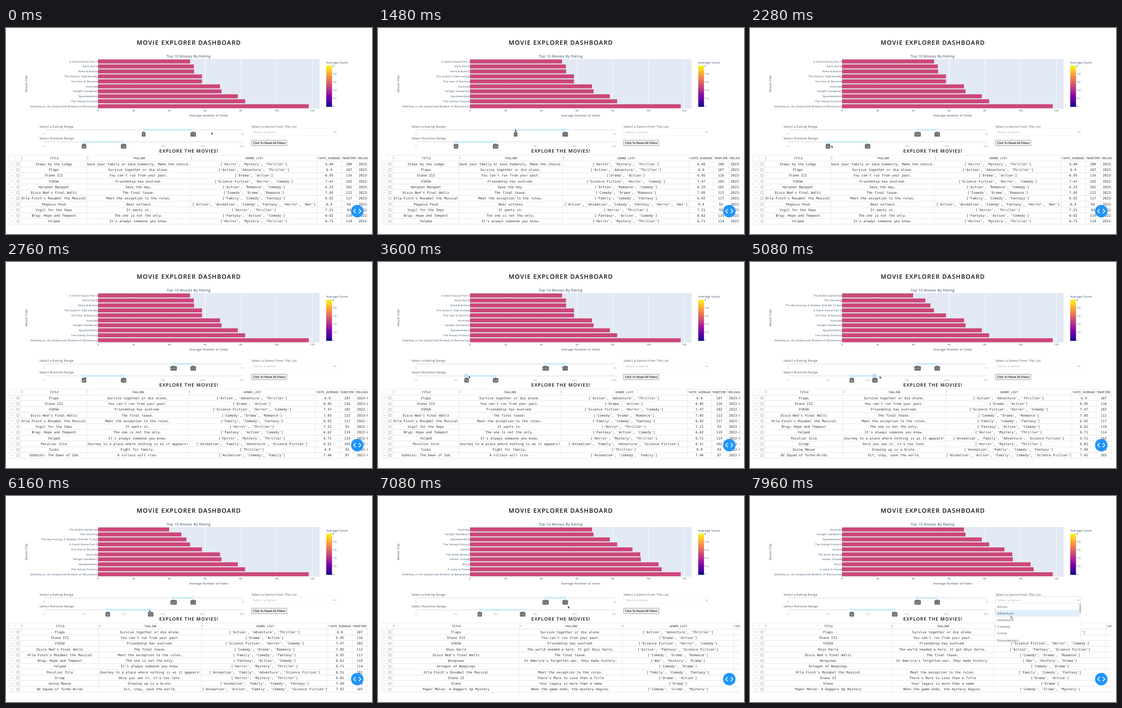
An HTML page that plays this animation: 720 px wide and 405 px high, repeating every 8 s.

```html
<!DOCTYPE html>
<html lang="en">
<head>
<meta charset="utf-8">
<title>Movie Explorer Dashboard</title>
<style>
  html, body { margin: 0; width: 100%; height: 100%; overflow: hidden; background: #fff; }
  svg { display: block; width: 100vw; height: 100vh; }
  text { font-family: "Open Sans", sans-serif; text-rendering: geometricPrecision; white-space: pre; }
  .mono { font-family: "DejaVu Sans Mono", monospace; }
  .button { font-family: "Liberation Sans", sans-serif; }
</style>
</head>
<body>
<svg viewBox="0 0 720 405">
  <defs>
    <clipPath id="tableClip"><rect x="0" y="245" width="712" height="142"/></clipPath>
    <clipPath id="menuClip"><rect x="483" y="211" width="168" height="75.5"/></clipPath>
    <linearGradient id="plasma" x1="0" y1="1" x2="0" y2="0"></linearGradient>
  </defs>
  <g id="page"></g>
  <g id="chart"></g>
  <g id="table" clip-path="url(#tableClip)"></g>
  <g id="sliders"></g>
  <g id="menu"></g>
  <g id="cursor"></g>
</svg>
<script>
const LOOP = 8000;
const layer = id => document.getElementById(id);

// Markup helpers; the y of a text is its visual middle.
const text = (x, y, str, { size = 6, fill = "#333", anchor = "start", spacing = 0, weight = 400, cls = "", extra = "" } = {}) =>
  `<text class="${cls}" x="${x}" y="${y + size * 0.36}" font-size="${size}" fill="${fill}" text-anchor="${anchor}" letter-spacing="${spacing}" font-weight="${weight}" ${extra}>${str}</text>`;
const rect = (x, y, w, h, fill, extra = "") =>
  `<rect x="${x}" y="${y}" width="${w}" height="${h}" fill="${fill}" ${extra}/>`;
const line = (x1, y1, x2, y2, color, width = 0.6) =>
  `<path d="M${x1} ${y1}L${x2} ${y2}" stroke="${color}" stroke-width="${width}"/>`;
const path = (d, extra) => `<path d="${d}" ${extra}/>`;

const heading = (x, y, str, size, spacing) => text(x, y, str, { size, spacing, weight: 600, fill: "#111", anchor: "middle" });
const label = (x, y, str, fill = "#444", weight = 400) => text(x, y, str, { size: 6, spacing: 0.35, fill, weight });
const chartText = (x, y, str, size, anchor = "middle", extra = "") =>
  text(x, y, str, { size, anchor, extra, spacing: 0.33, fill: "#2a3f5f", weight: 500 });

// ---------- Data ----------
const ratingBars = {
  "Otterboy or (An Unplanned Wisdom of Reluctance)": 595.5,
  "A Lamp Is Found": 558, "Brunt": 552, "Harbor Grande": 517, "The Ninth Mineral": 516, "Vandro": 500.5,
  "The Holvey Protocol": 470.5, "Spookwardens": 456, "Twilight Gardeners": 424, "Huntvale": 421,
  "The Year of Rosmira": 385.5, "The Sultan's Odd Holiday": 385.5, "Nima &amp; Button": 370, "Early Storm": 369.5,
  "A Silent House Part II": 362, "The Murmuring: A Shadow Told Me To Run": 355,
  "The Courtling": 345, "The Noble Harkwinds": 321
};
const longFilms = ["A Lamp Is Found", "Brunt", "Harbor Grande", "The Ninth Mineral", "Vandro"];
const shortFilms = ["The Sultan's Odd Holiday", "Nima &amp; Button", "Early Storm"];
const without = hidden => Object.keys(ratingBars).filter(name => !hidden.includes(name)).slice(0, 10).reverse();
const charts = [without(longFilms), without([...longFilms, ...shortFilms]), without([])];

const movies = {
  lodge: ["Steps by the Lodge", "Save your family or save humanity. Make the choice.", "Horror,Mystery,Thriller", 6.46, 100, "2023-02-01"],
  flaps: ["Flaps", "Survive together or die alone.", "Action,Adventure,Thriller", 6.9, 107, "2023-01-12"],
  stane3: ["Stane III", "You can't run from your past.", "Drama,Action", 6.95, 116, "2023-03-01"],
  doll: ["V1KSA", "Friendship has evolved.", "Science Fiction,Horror,Comedy", 7.47, 102, "2022-12-28"],
  harpoon: ["Harpoon Banquet", "Save the day.", "Action,Romance,Comedy", 6.33, 101, "2023-01-18"],
  waltz: ["Disco Ned's Final Waltz", "The final tease.", "Comedy,Drama,Romance", 7.05, 112, "2023-02-08"],
  musical: ["Orla Finch's Rosabel the Musical", "Meet the exception to the rules.", "Family,Comedy,Fantasy", 6.92, 117, "2022-11-25"],
  feud: ["Pegasus Feud", "Bear witness", "Action,Animation,Comedy,Fantasy,Horror,War", 6.4, 92, "2022-10-21"],
  vigil: ["Vigil for the Imps", "It wants in.", "Horror,Thriller", 7.21, 93, "2022-10-23"],
  brug: ["Brug: Hope and Tempest", "The one is not the only.", "Fantasy,Action,Comedy", 6.62, 119, "2022-07-06"],
  yelped: ["Yelped", "It's always someone you know.", "Horror,Mystery,Thriller", 6.71, 114, "2022-01-12"],
  isle: ["Peculiar Isle", "Journey to a place where nothing is as it appears!", "Animation,Family,Adventure,Science Fiction", 6.51, 102, "2022-11-23"],
  tusks: ["Tusks", "Fight for family.", "Thriller", 6.9, 93, "2022-08-11"],
  gobbins: ["Gobbins: The Dawn of Zob", "A villain will rise.", "Animation,Comedy,Family", 7.46, 87, "2022-06-29"],
  grimp: ["Grimp", "Once you see it, it's too late.", "Horror,Mystery,Thriller", 6.81, 115, "2022-09-23"],
  mauve: ["Going Mauve", "Growing up is a brute.", "Animation,Family,Comedy,Fantasy", 7.49, 100, "2022-03-10"],
  birds: ["QV Squad of Turbo-Birds", "Sit, stay, save the world.", "Animation,Action,Family,Comedy,Science Fiction", 7.42, 105, "2022-07-27"],
  onyx: ["Onyx Varro", "The world needed a hero. It got Onyx Varro.", "Action,Fantasy,Science Fiction", 7.2, 125, "2022-10-19"],
  wings: ["Wingvows", "In America's forgotten war, they made history.", "War,History,Drama", 7.2, 139, "2022-11-23"],
  octagon: ["Octagon of Weepings", "", "Comedy,Drama", 7.2, 147, "2022-09-18"],
  stane2: ["Stane II", "There's More to Lose than a Title", "Drama,Action", 7, 130, "2018-11-21"],
  stane1: ["Stane", "Your legacy is more than a name", "Drama", 7.4, 133, "2015-11-25"],
  melon: ["Paper Melon: A Daggers Up Mystery", "When the game ends, the mystery begins.", "Comedy,Crime,Mystery", 7.1, 140, "2022-11-23"]
};
// Each table: right edges of the three text columns, then its rows.
const tables = [
  [[159, 363, 612], "lodge flaps stane3 doll harpoon waltz musical feud vigil brug yelped"],
  [[159, 359, 608.5], "flaps stane3 doll waltz musical vigil brug yelped isle tusks gobbins"],
  [[182.5, 384.5, 633], "flaps stane3 doll waltz musical brug yelped isle grimp mauve birds"],
  [[278, 480, 700], "flaps stane3 doll onyx waltz wings octagon musical stane2 stane1 melon"]
];
const columnNames = ["TITLE", "TAGLINE", "GENRE_LIST", "VOTE_AVERAGE", "RUNTIME", "RELEASE_DATE"];
const genres = ["Action", "Adventure", "Animation", "Comedy", "Crime", "Documentary"];

// ---------- Static page ----------
const plasma = ["#0d0887", "#46039f", "#7201a8", "#9c179e", "#bd3786", "#d8576b", "#ed7953", "#fb9f3a", "#fdca26", "#f0f921"];
layer("plasma").innerHTML = plasma.map((c, i) => `<stop offset="${i / 9}" stop-color="${c}"/>`).join("");

function drawPage() {
  let out = heading(359.8, 28.5, "MOVIE EXPLORER DASHBOARD", 12, 1.17)
    + heading(359.8, 241.5, "EXPLORE THE MOVIES!", 9.2, 0.95)
    + chartText(359.2, 55.5, "Top 10 Movies By Rating", 7)
    + chartText(399.2, 172, "Average Number of Votes", 5.8)
    + chartText(40, 109.5, "Movie Title", 5.8, "middle", `transform="rotate(-90 40 109.5)"`)
    + chartText(630, 68, "Average Score", 5.8, "start")
    + rect(181, 61, 436, 97.5, "#e3e9f4")
    + rect(630, 74, 11.3, 81, "url(#plasma)");
  for (let k = 0; k <= 12; k += 2) {
    const x = 181 + k * 35.13;
    if (k) out += line(x, 61, x, 158.5, "#fff", 0.8);
    out += chartText(x, 162, k ? k + "k" : "0", 5);
  }
  for (let i = 0; i <= 5; i++) out += chartText(642.5, 74 + i * 16.1, +(8 - i * 0.2).toFixed(1), 5, "start");
  out += label(66, 193.5, "Select a Rating Range") + label(66, 217, "Select Runtime Range")
    + label(483, 193.5, "Select a Genre From The List")
    + rect(483, 220.7, 69.5, 10.8, "#efefef", `stroke="#767676" stroke-width=".6"`)
    + text(517.7, 226.2, "Click To Reset All Filters", { size: 5.95, fill: "#000", anchor: "middle", cls: "button" });
  layer("page").innerHTML = out;
}

function drawChart(names) {
  layer("chart").innerHTML = names.map((name, i) => {
    const y = 65.8 + i * 9.78;
    return rect(181, y - 3.9, ratingBars[name] - 181, 7.8, "#cc4778") + chartText(181, y, name, 5, "end");
  }).join("");
}

function drawTable([edges, keys]) {
  const vote = edges[2];
  const cols = [29.3, ...edges, vote + 48, vote + 77.6, vote + 125.6];
  const top = 250, first = 261.7, pitch = 11.27, bottom = first + 11 * pitch;
  const cell = (i, y, str, size, dx = 0, fill = "#333") =>
    text((cols[i] + cols[i + 1]) / 2 + dx, y, str, { size, fill, anchor: "middle", cls: "mono" });
  let out = line(6, top, 712, top, "#ddd");
  [6.3, 17.8, ...cols].forEach(x => out += line(x, top, x, bottom, "#d9d9d9", 0.5));
  columnNames.forEach((name, i) => {
    const x = cols[i] + 2;
    out += cell(i, 255.6, name, 5.8, 0.9)
      + path(`M${x - 1.3} 254.9h2.6l-1.3-1.7zM${x - 1.3} 255.9h2.6l-1.3 1.7z`, `fill="#999"`);
  });
  keys.split(" ").forEach((key, r) => {
    const [title, tagline, genre, ...rest] = movies[key];
    const y = first + (r + 0.5) * pitch;
    out += line(6, y - pitch / 2, 712, y - pitch / 2, "#d3d3d3")
      + path(`M10.2 ${y - 1.7}l3.4 3.4m0-3.4l-3.4 3.4`, `stroke="#aaa" stroke-width=".6"`)
      + rect(21.2, y - 2.2, 4.6, 4.6, "#fff", `stroke="#777" stroke-width=".6" rx=".6"`);
    [title, tagline, `['${genre.split(",").join("', '")}']`, ...rest].forEach((v, i) => out += cell(i, y, v, 6.61));
  });
  out += line(6, bottom, 712, bottom, "#d3d3d3")
    + `<circle cx="691" cy="360" r="12.3" fill="#2196fa"/>`
    + path("M688 356l-4 4 4 4M694 356l4 4-4 4", `fill="none" stroke="#fff" stroke-width="1.5"`);
  layer("table").innerHTML = out;
}

function drawMenu(focus) {
  const open = focus >= 0;
  const arrow = open ? "M644 205.6h4.4l-2.2-2.2z" : "M644 203.9h4.4l-2.2 2.2z";
  let out = rect(483, 197.5, 168, 13.7, "#fff", `stroke="${open ? "#ccc" : "#ececec"}" stroke-width=".5"`)
    + label(486.5, 204.5, "Select a Genre", "#aaa") + path(arrow, `fill="#999"`);
  if (open) {
    out += rect(483, 211, 168, 75.5, "#fff", `stroke="#ddd" stroke-width=".5"`) + `<g clip-path="url(#menuClip)">`;
    genres.forEach((name, i) => {
      const y = 217.7 + i * 13.15;
      if (i === focus) out += rect(483, y - 6.6, 165, 13.15, "#e1effc");
      out += label(486.5, y, name, "#444", 500);
    });
    out += "</g>" + rect(648, 211.5, 3, 18.5, "#c1c1c1", `rx="1.2"`);
  }
  layer("menu").innerHTML = out;
}

// ---------- Motion ----------
// Eased value of a track [[time, ...values], ...] at time t.
function along(track, t) {
  const i = track.findIndex(k => k[0] > t);
  if (i === 0) return track[0].slice(1);
  if (i < 0) return track[track.length - 1].slice(1);
  const [a, b] = [track[i - 1], track[i]];
  const p = (t - a[0]) / (b[0] - a[0]), e = p * p * (3 - 2 * p);
  return a.slice(1).map((v, j) => v + (b[j + 1] - v) * e);
}
const stepAt = (times, t) => times.filter(s => t >= s).length;
const within = (t, from, to) => t >= from && t < to;

const pointerTrack = [
  [520, 403.8, 204.5], [1320, 269.5, 198.7], [1680, 269.5, 198.7], [2000, 328, 199], [2060, 328, 199],
  [2280, 160, 230.5], [2520, 158, 229], [3000, 152, 222.5], [3400, 152, 222.5], [3600, 178.5, 223.5],
  [3860, 199, 223], [4400, 199, 223], [4520, 231, 223], [4680, 231, 223], [5080, 255, 224],
  [5240, 257, 224], [5480, 257, 224], [6100, 281.5, 223.7], [6840, 281.5, 223.7], [7400, 514, 203.5],
  [7760, 514, 203.5], [7960, 513.3, 236]
];
const ratingLow = [[1680, 5], [2040, 6.51]];
const runtimeLow = [[3400, 60], [3600, 76], [3900, 96]];
const runtimeHigh = [[4680, 120], [5080, 131], [5240, 140], [5480, 140], [6120, 161]];

function slider(y, scale, marks, values, texts, active) {
  const xs = values.map(v => 74.7 + v * scale);
  let out = rect(74.7, y - 0.9, 391.5, 1.8, "#e9e9e9", `rx=".9"`) + rect(xs[0], y - 0.9, xs[1] - xs[0], 1.8, "#abe2fb");
  marks.forEach(m => out += text(74.9 + m * scale, y + 7.8, m, { size: 5, fill: "#999", anchor: "middle", spacing: 0.3 }));
  xs.forEach((x, i) => {
    const w = 5.2 + texts[i].length * 1.85;
    if (active === i) out += `<circle cx="${x}" cy="${y}" r="4.3" fill="#96dbfa" opacity=".6"/>`;
    out += `<circle cx="${x}" cy="${y}" r="2.4" fill="#fff" stroke="${active === i ? "#57c5f7" : "#96dbfa"}" stroke-width=".9"/>`
      + path(`M${x - 0.8} ${y + 4.4}h3.4l-1.7-1.5z`, `fill="#666"`)
      + rect(x + 0.9 - w / 2, y + 4.3, w, 8.9, "#666", `rx="1.6"`)
      + text(x + 1, y + 8.8, texts[i], { size: 5, fill: "#fff", anchor: "middle", spacing: 0.2 });
  });
  return out;
}

function drawSliders(t) {
  const [rating] = along(ratingLow, t), [low] = along(runtimeLow, t), [high] = along(runtimeHigh, t);
  const ratingActive = within(t, 1600, 2060) ? 0 : -1;
  const runtimeActive = within(t, 3360, 4420) ? 0 : within(t, 4560, 6100) ? 1 : -1;
  layer("sliders").innerHTML =
    slider(200.4, 39.03, [0, 10], [rating, 7.5], [String(+rating.toFixed(2)), "7.5"], ratingActive)
    + slider(223.9, 1.298, [0, 60, 120, 180, 240, 300], [low, high], [low, high].map(v => String(Math.round(v))), runtimeActive);
}

const arrowShape = "M0 0V5.2L1.2 4.1 2 6 2.9 5.6 2.1 3.8H3.7Z";
const handShape = "M.2 0Q1-.2 1 .6V2.2L3.2 2.7Q3.8 3 3.6 3.8L3.2 5.6H.6L-1 3.4Q-.8 2.7-.2 3.2Z";
function drawCursor(t) {
  const [x, y] = along(pointerTrack, t);
  const overOption = t >= 7800;
  layer("cursor").innerHTML = path(overOption ? handShape : arrowShape,
    `transform="translate(${x} ${y})" fill="${overOption ? "#fff" : "#000"}" stroke="${overOption ? "#000" : "#fff"}" stroke-width=".5"`);
}

// Layers below are redrawn only when their state changes.
const shown = {};
function show(name, state, draw) {
  if (shown[name] === state) return;
  shown[name] = state;
  draw(state);
}

const start = performance.now();
function frame(now) {
  const t = Math.max(0, now - start) % LOOP;
  show("chart", stepAt([4720, 6400], t), i => drawChart(charts[i]));
  show("table", stepAt([2560, 4720, 6400], t), i => drawTable(tables[i]));
  show("menu", stepAt([7480, 7880], t) - 1, drawMenu);
  drawSliders(t);
  drawCursor(t);
  requestAnimationFrame(frame);
}

drawPage();
frame(start);
</script>
</body>
</html>
```
